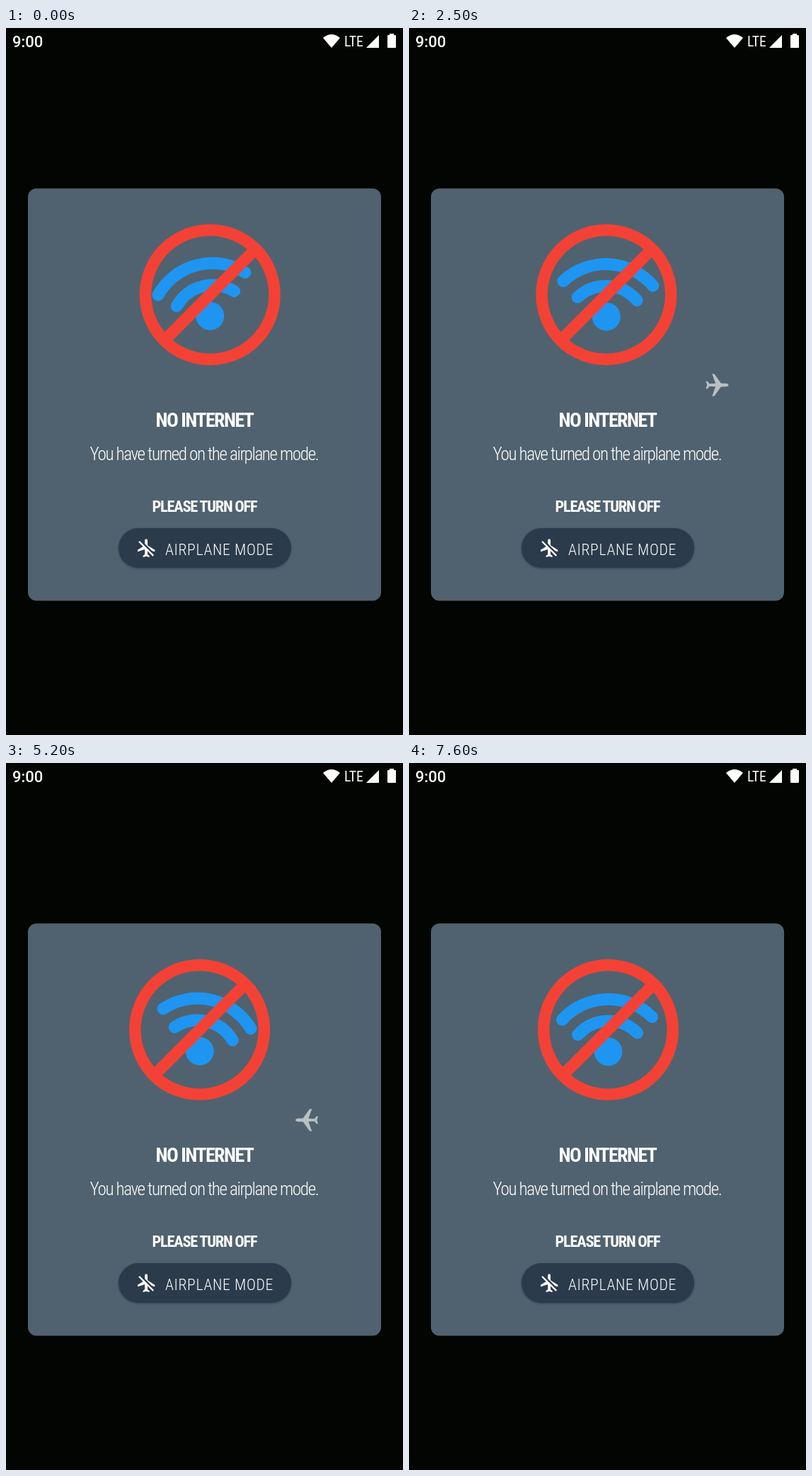
Write an HTML page that moves like this. It is 561 px wide and 998 px high and loops after 7.65 s.

```html
<!DOCTYPE html>
<html lang="en">
<head>
<meta charset="utf-8">
<title>No internet</title>
<style>
  html, body { margin: 0; width: 100%; height: 100%; overflow: hidden; background: #030502; }
  svg { display: block; width: 100vw; height: 100vh; }
  text { fill: #fff; font-family: "Oswald", "Roboto Condensed", "Open Sans Condensed", "Roboto", "Open Sans", sans-serif; font-stretch: condensed; }
  .mid { text-anchor: middle; letter-spacing: -.055em; }
  .bold { font-weight: 600; }
  .light { font-weight: 300; }
  .clock { font: 500 22px "Roboto", sans-serif; }
  .wide { letter-spacing: .03em; }
  .red { fill: none; stroke: #f34235; stroke-width: 16.5; }
  .blue { fill: none; stroke: #1e95f1; stroke-width: 17; stroke-linecap: round; }
  .button { fill: #2b3b4b; filter: drop-shadow(0 1.5px 1.5px #0005); }
</style>
</head>
<body>
<svg viewBox="0 0 561 998">
  <clipPath id="card"><rect x="31" y="226.5" width="499" height="582" rx="12"/></clipPath>

  <!-- status bar -->
  <text class="clock" x="9" y="27">9:00</text>
  <text x="478" y="26" font-size="20" data-max="27">LTE</text>
  <g fill="#fff">
    <path d="M448 14Q460 4 472 14L460 28Z"/>
    <path d="M527 10V28H509Z"/>
    <path d="M542 8h6v2h2q1 0 1 1v16q0 1-1 1h-10q-1 0-1-1V11q0-1 1-1h2Z"/>
  </g>

  <rect x="31" y="226.5" width="499" height="582" rx="12" fill="#50626f"/>

  <g id="wifi">
    <path class="blue" d="M-63.5 -16A88 88 0 0 1 63.5 -16"/>
    <path class="blue" d="M-42 5.8A58 58 0 0 1 42 5.8"/>
    <circle cy="31" r="20" fill="#1e95f1"/>
  </g>
  <g id="ban" class="red">
    <circle r="91.3"/>
    <path d="M-64 64L64 -64"/>
  </g>

  <g clip-path="url(#card)">
    <path id="plane" fill="#b9bfc2" d="M16 0C16 -1.5 14.5 -2.2 12.5 -2.2L5.5 -2.4L-3 -14.6Q-3.8 -15.7 -5 -15.7H-7L-2.3 -2.2L-10.8 -1.8L-13.4 -5.2H-15.8L-14.2 0L-15.8 5.2H-13.4L-10.8 1.8L-2.3 2.2L-7 15.7H-5Q-3.8 15.7 -3 14.6L5.5 2.4L12.5 2.2C14.5 2.2 16 1.5 16 0Z"/>
  </g>

  <text class="mid bold" x="280.5" y="563" font-size="32" data-max="138">NO INTERNET</text>
  <text class="mid light" x="280" y="610" font-size="28" data-max="323">You have turned on the airplane mode.</text>
  <text class="mid bold" x="280.5" y="683" font-size="26" data-max="148">PLEASE TURN OFF</text>

  <rect class="button" x="159" y="706" width="244" height="56" rx="28"/>
  <path fill="#fff" transform="translate(183.4 718.8) scale(1.28)" d="M13 9V3.5C13 2.67 12.33 2 11.5 2S10 2.67 10 3.5V7.18L17.83 15.01L21 16V14ZM3 5.27L7.99 10.26L2 14V16L10 13.5V19L8 20.5V22L11.5 21L15 22V20.5L13 19V15.27L18.73 21L20 19.73L4.27 4Z"/>
  <text class="light wide" x="225" y="744" font-size="25" data-max="153">AIRPLANE MODE</text>
</svg>
<script>
  const LOOP = 7650, STEP = 50, SWING = 2050, FLIGHT = 4040;
  const CX = 280.5, CY = 376.5;
  const [wifi, ban, plane] = ["wifi", "ban", "plane"].map(id => document.getElementById(id));
  const place = (el, x, y, extra = "") => el.setAttribute("transform", `translate(${x} ${y}) ${extra}`);

  // Choose a smaller type size where the available face runs too wide.
  for (const el of document.querySelectorAll("[data-max]")) {
    const size = +el.getAttribute("font-size");
    el.setAttribute("font-size", size * Math.min(1, el.dataset.max / el.getComputedTextLength()));
  }

  function draw(t) {
    const swing = Math.cos(2 * Math.PI * t / SWING + .384);
    place(wifi, CX, CY, `rotate(${-15.6 * swing})`);
    place(ban, CX + 8.4 * swing, CY);

    const phase = Math.PI * (t - 1805) / FLIGHT;
    place(plane, CX + 301 * Math.sin(phase), 504, `scale(${Math.cos(phase) < 0 ? -1 : 1} 1)`);
  }

  const start = performance.now();
  function tick() {
    const t = (performance.now() - start) % LOOP;
    draw(Math.floor(t / STEP) * STEP);
    requestAnimationFrame(tick);
  }
  tick();
</script>
</body>
</html>
```
